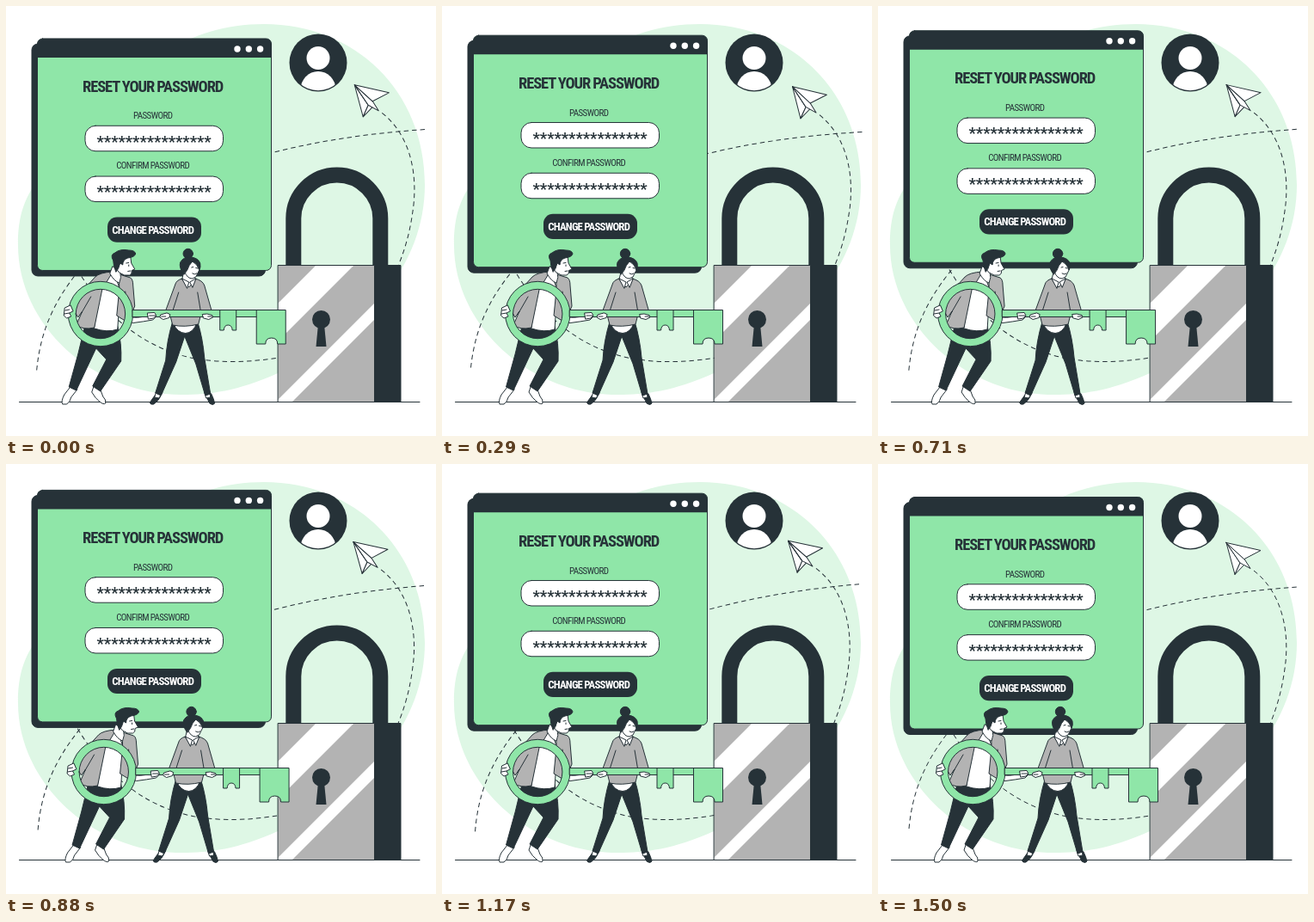
Animation, 500 px wide and 500 px high, one loop 1.54 s. Source, as an HTML page:

```html
<!DOCTYPE html>
<html lang="en">
<head>
<meta charset="utf-8">
<title>Reset your password</title>
<style>
  html, body { margin: 0; height: 100%; overflow: hidden; background: #fff; }
  svg { display: block; width: 100%; height: 100%; --dark: #263238; --green: #8fe6a8; --gray: #b3b3b3; }
  .line { stroke: var(--dark); stroke-width: 1; stroke-linejoin: round; stroke-linecap: round; }
  .dark { fill: var(--dark); }
  .green { fill: var(--green); }
  .gray { fill: var(--gray); }
  .white { fill: #fff; }
  .none { fill: none; }
  .dash { stroke-dasharray: 5.5 4; stroke-linecap: butt; }
  text { font-family: "Roboto Condensed", "Open Sans", Roboto, sans-serif; font-stretch: 75%; text-anchor: middle; fill: var(--dark); }
  .title { font-size: 18.5px; font-weight: 700; letter-spacing: -1.1px; }
  .label { font-size: 11px; letter-spacing: -.6px; }
  .button { font-size: 12.8px; font-weight: 700; letter-spacing: -.8px; fill: #fff; }
  .stars { font-size: 19px; font-weight: 500; text-anchor: start; }
</style>
</head>
<body>
<svg viewBox="0 0 500 500">
  <defs>
    <clipPath id="disc"><circle cx="363" cy="66" r="32.3"/></clipPath>
    <clipPath id="face"><path d="M316.5 301.5H428.5V461H316.5Z"/></clipPath>
  </defs>

  <path fill="#def7e5" d="M300 21C405 21 487 98 487 208C487 300 420 380 316 427C270 448 235 452 205 452C100 452 14 370 14 278C14 215 40 200 90 140C150 70 210 21 300 21Z"/>

  <g id="plane" class="line">
    <path class="none dash" d="M36 424C40 380 55 345 84 309C130 250 210 195 309 170.500C370 155 430 147 488 143"/>
    <path class="none dash" d="M437 124C468 148 478 190 474 230C470 265 462 295 440 335C415 380 365 403 316 409C285 414 250 416 215 409C165 398 115 365 78 298"/>
    <path class="white" d="M405 91.500L415 128.500L421 115Z"/>
    <path class="white" d="M405 91.500L421 115L415 128.500L426 117Z"/>
    <path class="white" d="M405 91.500L421 115L433 121.500L426 110.500Z"/>
    <path class="white" d="M405 91.500L445 100.500L426 110.500Z"/>
  </g>

  <g id="window">
    <rect class="dark line" x="30" y="44.500" width="271.500" height="270" rx="7"/>
    <rect class="green line" x="36.500" y="38.500" width="272" height="269.500" rx="6"/>
    <path class="dark" d="M36.500 60.500V44.500a6 6 0 0 1 6-6H302.500a6 6 0 0 1 6 6V60.500Z"/>
    <g class="white">
      <circle cx="269" cy="50.500" r="3.700"/><circle cx="282.300" cy="50.500" r="3.700"/><circle cx="295.600" cy="50.500" r="3.700"/>
    </g>
    <text class="title" x="170.600" y="100.200">RESET YOUR PASSWORD</text>
    <text class="label" x="170.700" y="131.900">PASSWORD</text>
    <rect class="white line" x="92" y="139.800" width="160.500" height="29.500" rx="12"/>
    <text class="label" x="170.700" y="189.900">CONFIRM PASSWORD</text>
    <rect class="white line" x="92" y="198.600" width="160.500" height="29.500" rx="12"/>
    <g id="stars"></g>
    <rect class="dark" x="118" y="246" width="109" height="29.200" rx="11"/>
    <text class="button" x="170.700" y="265.200">CHANGE PASSWORD</text>
  </g>

  <circle class="dark" cx="363" cy="66" r="33.500"/>
  <g class="white" clip-path="url(#disc)">
    <circle cx="363" cy="60.500" r="13.500"/>
    <ellipse cx="363" cy="97" rx="20.500" ry="21"/>
  </g>

  <path class="none" stroke="#263238" stroke-width="18" d="M334.300 302V247a50.500 50.500 0 0 1 101 0V302"/>
  <path class="dark line" d="M428.500 301.500H459V460.500H428.500Z"/>
  <g clip-path="url(#face)">
    <path class="gray" d="M316 301H429V461H316Z"/>
    <path class="white" d="M362 300H406L300 406V362ZM440 334V353L325 468H306Z"/>
  </g>
  <path class="none line" d="M316.500 301.500H428.500V460.500H316.500Z"/>
  <circle class="dark" cx="366.500" cy="364.500" r="10.500"/>
  <path class="dark" d="M363 370H370L372.500 396H360.500Z"/>

  <path class="line" d="M15.500 460.500H481"/>

  <g id="people" class="line">
    <!-- man -->
    <path class="white" d="M75 443L68 452Q64 460 66 463H71Q75 460 76 455L83 446Z"/>
    <path class="white" d="M103 440L100 449Q104 456 109 460Q114 464 116 462Q117 458 113 454L110 446Z"/>
    <path class="dark" d="M92 372L84 405L73.500 443L82 447L105 398L117 411L101 442L110 448L134 413Q135 393 130 372Z"/>
    <path class="white" d="M112 316L126 311L133 330L130 376Q118 380 103 375Z"/>
    <path class="gray" d="M124 309Q109 310 104 315L75 347L84 362L89 355L82 371Q90 377 103 374L112 330Z"/>
    <path class="gray" d="M132 312L145 316Q148 318 148 325L150 349L142 368L129 360L132 330Z"/>
    <path class="none" d="M99 338L88 357M139 332L141 348"/>
    <path class="white" d="M124 303L121 311Q126 320 132 322Q135 316 133 309Z"/>
    <path class="white" d="M129 296L128 305Q131 311 138 313L144 313Q147 312 146.500 307.500L150 306L146 299L145 291Z"/>
    <path class="dark" d="M128 309Q125 302 125 296Q121 289 127 287Q133 282 143 284Q150 284 151 288Q150 292 142 293Q136 295 136 301L133 299L131 305Z"/>
    <path class="none" d="M140 299L143 298.500M142 308.500L145 308M143 301V302.500"/>
    <path class="white" d="M141 361Q153 364 164 360L172 357L175 361L171 365Q160 367 148 368.500L138 367Z"/>

    <!-- woman -->
    <path class="dark" d="M174 452L167.500 461Q168 464 172 463Q177 460 180 454Z"/>
    <path class="dark" d="M232 452L237 462Q241 465 243 462Q242 457 239 451Z"/>
    <path class="white" d="M175 448L173 455L178 456L182 450ZM231 449L233 456L238 455L237 448Z"/>
    <path class="dark" d="M194 367Q187 390 186 412L174 450L180.500 453L198 414L208 384L221 416L232 453L238 451L231 409Q229 386 223 367Z"/>
    <path class="white" d="M195 369Q199 380 209 380.500Q218 380 222 369Z"/>
    <path class="gray" d="M205 317Q198 319 197 324L186 354L191 359L194 371Q208 374 224 370L227 358L236 358L239 353L231 325Q229 319 220 317Z"/>
    <path class="none" d="M201 333L193 358M223 333L227 357"/>
    <path class="white" d="M207 309L205 318L213 327L221 318L217 311Z"/>
    <path class="white" d="M205 317L213 321L211 328ZM221 317L214 321L217 327Z"/>
    <path class="white" d="M210 298L208 309Q211 317 217 317Q222 316 223 311L225 307L224 297Z"/>
    <circle class="dark" cx="212" cy="288" r="5.700"/>
    <path class="dark" d="M207 312Q201 304 203 298Q207 291 215 292Q224 293 226 299Q227 304 225 307Q223 300 217 297Q213 301 211 307Z"/>
    <path class="none" d="M216 304L218 303.500M221 304.500L223 305M217 311Q220 313 222 311"/>

    <!-- key -->
    <path class="green" fill-rule="evenodd" d="M72.500 358a37.700 37.700 0 1 0 75.400 0a37.700 37.700 0 1 0-75.400 0ZM81.500 358a28.700 28.700 0 1 1 57.400 0a28.700 28.700 0 1 1-57.400 0Z"/>
    <path class="green" d="M147.500 353.500H325.500V393H316Q316 386 309 386Q302 386 302 393H291.500V361.500H268V377H263.500Q263 371 258.500 371Q254 371 253.500 377H249V361.500H147.500Z"/>
    <path class="none" d="M249 361.500V353.500M268 361.500V353.500M291.500 361.500V353.500"/>

    <!-- hands -->
    <path class="white" d="M75 348L68.500 351L67.500 360L71 363L76 361L74 357L78 355Z"/>
    <path class="none" d="M69 354L74 353M68 358L74 357"/>
    <path class="white" d="M165 357L173 356.500L175 360L172 363L166 364Z"/>
    <path class="none" d="M167 360H174"/>
    <path class="white" d="M187 357L180 359L179 362L183 364.500L190 362.500L191 359Z"/>
    <path class="none" d="M181 361H186"/>
    <path class="white" d="M229 358.500L234 358L240 359.500L241 362L236 364.500L230 363Z"/>
    <path class="none" d="M235 361H240"/>
  </g>
</svg>
<script>
  const LOOP = 1540, STEPS = 37;
  const $ = id => document.getElementById(id);

  const xs = Array.from({ length: 16 }, (_, i) => 105.5 + i * 8.32).join(" ");
  $("stars").innerHTML = [164.2, 223]
    .map(y => `<text class="stars" x="${xs}" y="${y}">${"*".repeat(16)}</text>`).join("");

  const lift = [0, -10, 0];
  const sway = [0, 1, 0, -1, 0];
  const shake = [0, -1, 2, -4, 4, -4, 4, -4, 2, -1, 0];

  // Linear interpolation through evenly spaced keys.
  function at(keys, p) {
    const x = p * (keys.length - 1), i = Math.min(Math.floor(x), keys.length - 2);
    return keys[i] + (keys[i + 1] - keys[i]) * (x - i);
  }

  function draw() {
    const step = Math.floor((performance.now() + 5) / LOOP * STEPS) % STEPS;
    const p = (step + 1) / STEPS;
    $("window").setAttribute("transform", `translate(0 ${at(lift, p)})`);
    $("plane").setAttribute("transform", `rotate(${at(sway, p)} 262 257)`);
    $("people").setAttribute("transform", `translate(${at(shake, p)} 0)`);
    requestAnimationFrame(draw);
  }
  draw();
</script>
</body>
</html>
```
